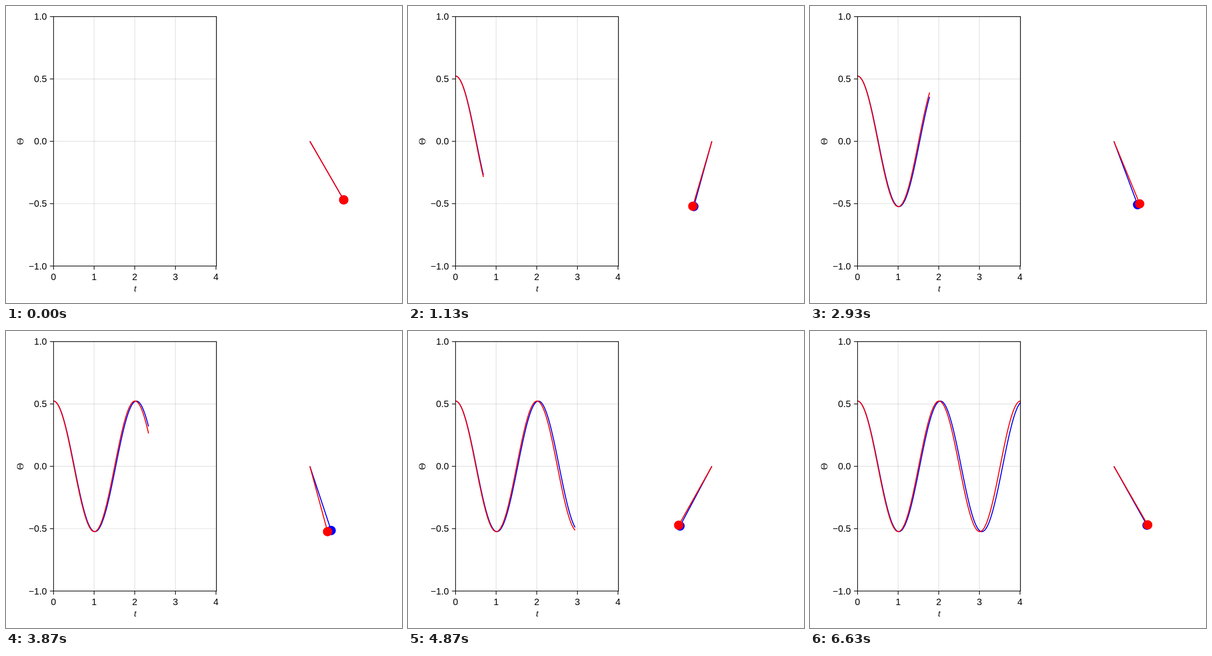
Animation of 864 by 648 pixels, one loop 6.66 s. Source, as an HTML page with a canvas:

```html
<!DOCTYPE html>
<html>
<head>
<meta charset="utf-8">
<title>Pendulum</title>
<style>
html, body { margin: 0; width: 100%; height: 100%; overflow: hidden; background: #fff; }
canvas { display: block; }
</style>
</head>
<body>
<canvas id="stage" width="864" height="648"></canvas>
<script>
const ctx = document.getElementById('stage').getContext('2d');
const UNIT = 1.44, LOOP = 6660, STEPS = 200;
const BOX = { left: 103.7, top: 23.2, right: 459.3, bottom: 567.4 };
const PIVOT = { x: 663, y: 295.1 }, ROD = 147.7;

// Two swings of a one metre pendulum, released at 30 degrees
const G = 9.81, START = Math.PI / 6, OMEGA = Math.sqrt(G);
const dt = 4 * Math.PI / OMEGA / (STEPS - 1);

const px = t => BOX.left + 88.63 * t;
const py = angle => 295.3 - 272.1 * angle;

// Full equation of motion, integrated with small symplectic steps
function swing() {
  const angles = [], sub = 100, h = dt / sub;
  let a = START, v = 0;
  for (let i = 0; i < STEPS; i++) {
    angles.push(a);
    for (let j = 0; j < sub; j++) {
      v -= G * Math.sin(a) * h / 2;
      a += v * h;
      v -= G * Math.sin(a) * h / 2;
    }
  }
  return angles;
}

const runs = [
  { color: '#00f', angles: swing() },
  { color: '#f00', angles: Array.from({ length: STEPS }, (_, i) => START * Math.cos(OMEGA * dt * i)) }
];

function line(points, color, width) {
  ctx.strokeStyle = color;
  ctx.lineWidth = width;
  ctx.beginPath();
  points.forEach(([x, y]) => ctx.lineTo(x, y));
  ctx.stroke();
}

function label(text, x, y, align, font = '"Liberation Sans", Arial, sans-serif', style = '') {
  ctx.font = `${style} 20.16px ${font}`;
  ctx.textAlign = align;
  ctx.fillStyle = '#000';
  ctx.fillText(text, x, y);
}

function drawGrid() {
  const grid = 'rgba(0,0,0,0.12)';
  for (let i = 0; i <= 4; i++) {
    const x = px(i), y = py(1 - i / 2);
    if (i) line([[x, BOX.top], [x, BOX.bottom]], grid, UNIT);
    line([[BOX.left, y], [BOX.right, y]], grid, UNIT);
  }
}

function drawAxes() {
  const { left, top, right, bottom } = BOX, tick = 5 * UNIT;
  const serif = '"Liberation Serif", Times, serif';
  for (let i = 0; i <= 4; i++) {
    const x = px(i), value = 1 - i / 2, y = py(value);
    line([[x, bottom], [x, bottom + tick + 0.7]], '#000', UNIT);
    line([[left, y], [left - tick - 0.7, y]], '#000', UNIT);
    label(i, x, 598.1, 'center');
    label(value.toFixed(1).replace('-', '\u2212'), 89.2, y + 7.1, 'right');
  }
  ctx.strokeStyle = '#000';
  ctx.lineWidth = UNIT;
  ctx.strokeRect(left, top, right - left, bottom - top);

  label('t', 282, 623.4, 'center', serif, 'italic');
  ctx.save();
  ctx.translate(38, 295.4);
  ctx.rotate(-Math.PI / 2);
  label('Θ', 0, 0, 'center', serif);
  ctx.restore();
}

function drawCurves(step) {
  const { left, top, right, bottom } = BOX;
  ctx.save();
  ctx.beginPath();
  ctx.rect(left, top, right - left, bottom - top);
  ctx.clip();
  for (const { color, angles } of runs)
    line(angles.slice(0, step + 1).map((a, i) => [px(i * dt), py(a)]), color, 1.5 * UNIT);
  ctx.restore();
}

function drawPendulums(step) {
  for (const { color, angles } of runs) {
    const a = angles[step];
    const x = PIVOT.x + ROD * Math.sin(a), y = PIVOT.y + ROD * Math.cos(a);
    line([[PIVOT.x, PIVOT.y], [x, y]], color, 1.5 * UNIT);
    ctx.fillStyle = color;
    ctx.beginPath();
    ctx.arc(x, y, 10.2, 0, 2 * Math.PI);
    ctx.fill();
  }
}

function render(ms) {
  // 30 steps per second, on a clock of hundredths
  const step = Math.floor((Math.floor(ms % LOOP / 10) + 0.4) * 0.3);
  ctx.clearRect(0, 0, 864, 648);
  drawGrid();
  if (step) drawCurves(step);
  drawAxes();
  drawPendulums(step);
}

const begin = performance.now();
function tick() {
  render(performance.now() - begin);
  requestAnimationFrame(tick);
}
tick();
</script>
</body>
</html>
```
